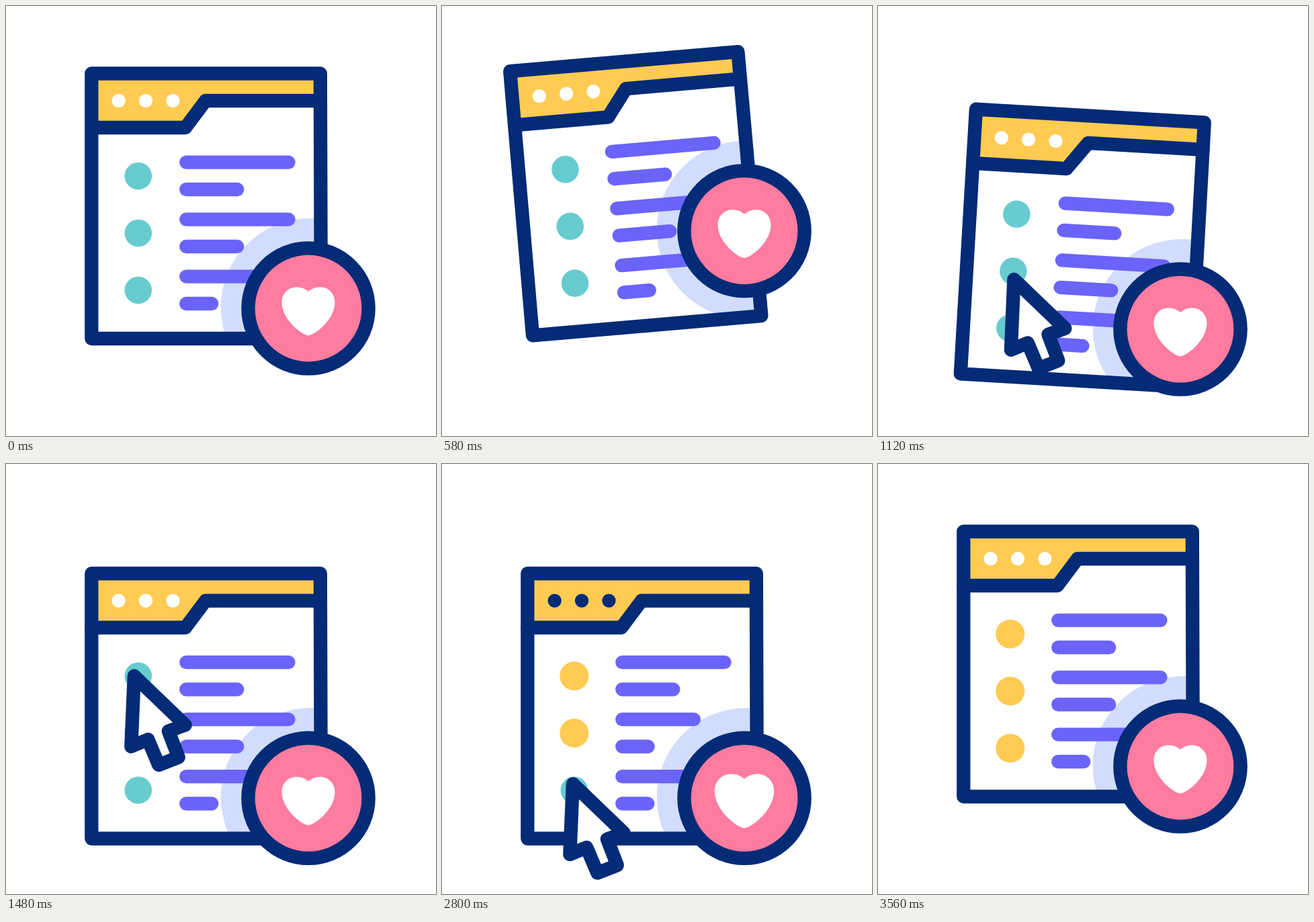
An HTML page with a canvas that plays this animation: 640 px wide and 640 px high, repeating every 3600 ms.

```html
<!DOCTYPE html>
<html lang="en">
<head>
<meta charset="utf-8">
<style>
  html, body { margin: 0; width: 100%; height: 100%; overflow: hidden; background: #fff; }
  canvas { display: block; width: 640px; height: 640px; }
</style>
</head>
<body>
<canvas id="stage" width="640" height="640"></canvas>
<script>
const ctx = document.getElementById('stage').getContext('2d');
const LOOP = 3600, STEP = 718, ROW = 85, LINE = 20.3;
const NAVY = '#032b76', YELLOW = '#ffcb52', TEAL = '#67cbd0', PURPLE = '#6a64fa',
      HALO = '#d2dcfd', PINK = '#fe7c9f', WHITE = '#fff';

let t = 0;

const smooth = p => p * p * (3 - 2 * p);

// Cubic bezier ease (.28, 0, .38, 1), solved by bisection.
function glide(p) {
  let lo = 0, hi = 1;
  for (let i = 0; i < 20; i++) {
    const u = (lo + hi) / 2, v = 1 - u;
    if (.84 * v * v * u + 1.14 * v * u * u + u * u * u < p) lo = u; else hi = u;
  }
  return smooth(lo);
}

// Eased progress from 0 to 1 between two times.
const ramp = (from, to, ease = smooth) => ease(Math.min(1, Math.max(0, (t - from) / (to - from))));

// Rises to 1 over the given time, then falls back.
const pulse = (from, rise) => ramp(from, from + rise) - ramp(from + rise, from + 2 * rise);

const windowY = () => -40 * ramp(50, 430) + 102.5 * ramp(430, 1130, glide) - 62.5 * ramp(3220, 3560);
const windowAngle = () => -5 * ramp(290, 606) + 10 * ramp(606, 944) - 5 * ramp(944, 1405);
const badgeY = () => 450 - 117 * ramp(70, 537) + 164.3 * ramp(537, 1262) - 47.3 * ramp(3240, 3560);
const heartScale = () => 1 + .14 * pulse(1900, 160) + .41 * (pulse(2220, 240) + pulse(2700, 285));
const headerInk = () => ramp(2060, 2110) - ramp(2380, 2430) + ramp(2740, 2790) - ramp(3100, 3150);

const frame = new Path2D('M127.3 100.5H467.8L469 495H127.3Z');
const tab = new Path2D('M127.3 100.5H467.8V141H297L267 181H127.3Z');
const fold = new Path2D('M127.3 181H267L297 141H467.8');
const arrow = new Path2D('M0 0L76 73L51 82L66 121L36.5 132.5L20.5 94.5L-4.5 105Z');
const halfHeart = new Path2D('M0-25C7-31 13-31.5 18-31.5C30-31.5 39.5-22 39.5-9C39.5 17 9 40.3 0 40.3H-1V-25Z');

function disc(x, y, r, color) {
  ctx.beginPath();
  ctx.arc(x, y, r, 0, 2 * Math.PI);
  ctx.fillStyle = color;
  ctx.fill();
}

function fill(path, color) {
  ctx.fillStyle = color;
  ctx.fill(path);
}

function outline(path) {
  ctx.strokeStyle = NAVY;
  ctx.stroke(path);
}

function bar(y, length) {
  ctx.strokeStyle = PURPLE;
  ctx.beginPath();
  ctx.moveTo(268.2, y);
  ctx.lineTo(268.2 + length, y);
  ctx.stroke();
}

function drawRow(i) {
  const y = 253 + ROW * i, start = STEP * i, isLast = i === 2;
  const trim = isLast ? 0 : pulse(1800 + start, 300);
  disc(196.8, y, 20.3, TEAL);
  disc(196.8, y, 21.5 * ramp(1560 + start, 1740 + start), YELLOW);
  bar(y - 20.4, 152.3 - 46 * trim);
  bar(y + 20, (isLast ? 38 : 76) - 38 * trim);
}

function drawHeader() {
  fill(tab, YELLOW);
  outline(fold);
  for (let i = 0; i < 3; i++) {
    const x = 167.6 + 40.4 * i;
    disc(x, 141, 10.2, WHITE);
    ctx.globalAlpha = headerInk();
    disc(x, 141, 10.2, NAVY);
    ctx.globalAlpha = 1;
  }
}

function drawWindow(badge) {
  ctx.save();
  ctx.translate(298.3, 413 + windowY());
  ctx.rotate(windowAngle() * Math.PI / 180);
  ctx.translate(-298.3, -413);
  ctx.save();
  ctx.clip(frame);
  ctx.resetTransform();
  disc(452.4, badge - 1.5, 132.7, HALO);
  ctx.restore();
  for (let i = 0; i < 3; i++) drawRow(i);
  drawHeader();
  outline(frame);
  ctx.restore();
}

function drawBadge(y) {
  const scale = heartScale();
  ctx.save();
  ctx.translate(450, y);
  disc(0, 0, 99.8, NAVY);
  disc(0, 0, 79.4, PINK);
  ctx.translate(0, 4.4 * (1 - scale));
  ctx.scale(scale, scale);
  fill(halfHeart, WHITE);
  ctx.scale(-1, 1);
  fill(halfHeart, WHITE);
  ctx.restore();
}

function drawCursor() {
  const enter = ramp(800, 1408, glide), exit = ramp(3240, 3520);
  const hops = ramp(1805, 2155) + ramp(1805 + STEP, 2155 + STEP);
  ctx.save();
  ctx.translate(235.5 - 44.7 * enter + 2.1 * hops + 9 * exit,
                669 - 353.5 * enter + ROW * hops + 194 * exit);
  fill(arrow, WHITE);
  outline(arrow);
  ctx.restore();
}

function draw() {
  t = performance.now() % LOOP;
  const badge = badgeY();
  ctx.fillStyle = WHITE;
  ctx.fillRect(0, 0, 640, 640);
  ctx.lineWidth = LINE;
  ctx.lineCap = ctx.lineJoin = 'round';
  drawWindow(badge);
  drawBadge(badge);
  drawCursor();
  requestAnimationFrame(draw);
}
draw();
</script>
</body>
</html>
```
